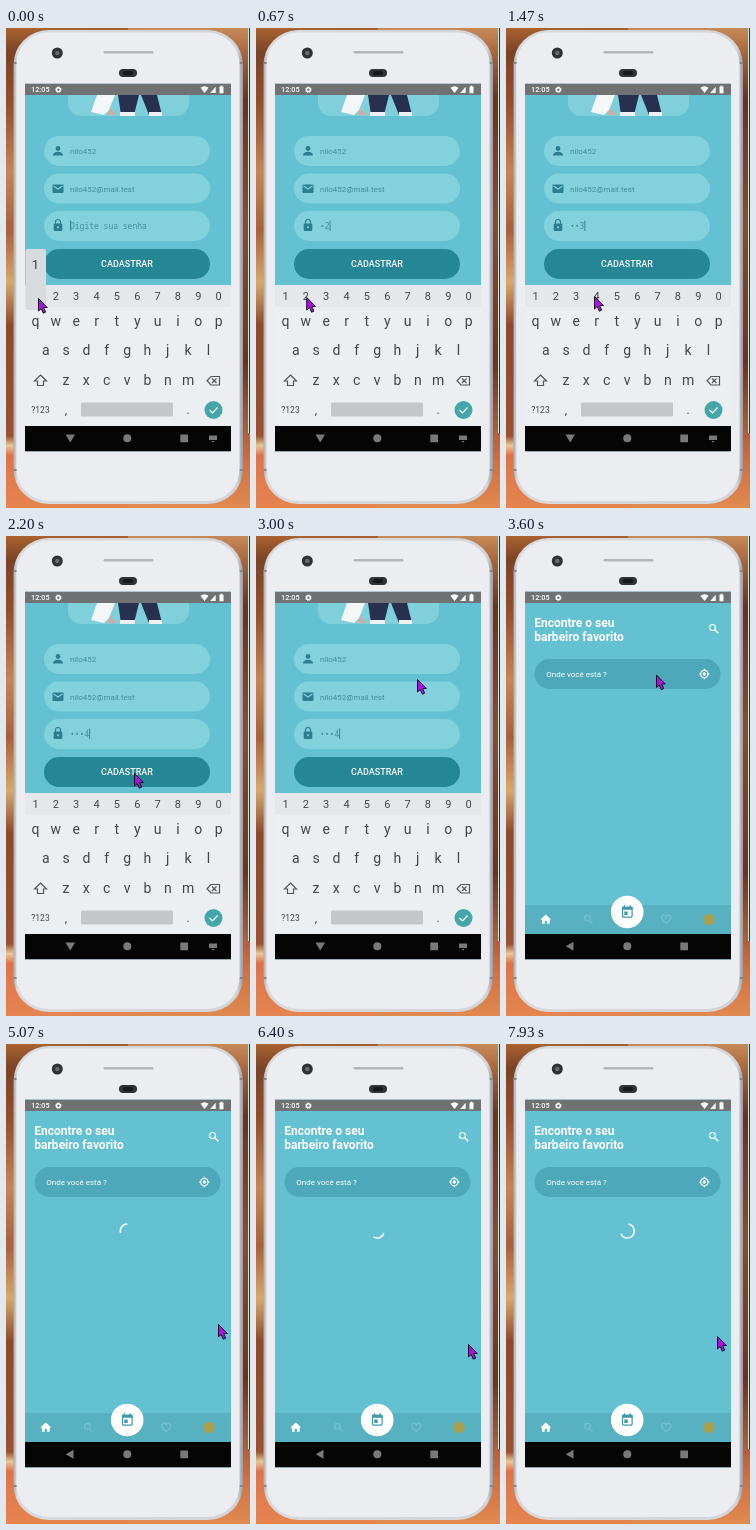
An HTML page that plays this animation: 244 by 480 pixels, repeating every 8000 ms.

```html
<!DOCTYPE html>
<html lang="pt-BR">
<head>
<meta charset="utf-8">
<title>Barbearia</title>
<style>
  html, body { margin: 0; width: 100%; height: 100%; overflow: hidden; background: #a85a33; }
  svg { display: block; width: 100%; height: 100%; font-family: Roboto, sans-serif; }
  .mono { font-family: "Noto Sans Mono", "DejaVu Sans Mono", monospace; }
  .mid { text-anchor: middle; }
  .line { fill: none; stroke-width: 1.2; }
</style>
</head>
<body>
<svg viewBox="0 0 244 480">
  <defs>
    <linearGradient id="wallLeft" x2="0" y2="1">
      <stop offset="0" stop-color="#a9622f"/><stop offset=".05" stop-color="#7b4426"/>
      <stop offset=".16" stop-color="#92502c"/><stop offset=".3" stop-color="#c48656"/>
      <stop offset=".42" stop-color="#a8613a"/><stop offset=".53" stop-color="#d9a86c"/>
      <stop offset=".62" stop-color="#8a4a2c"/><stop offset=".85" stop-color="#9a5232"/>
      <stop offset=".87" stop-color="#ecc79a"/><stop offset=".89" stop-color="#dd7448"/>
      <stop offset="1" stop-color="#e58550"/>
    </linearGradient>
    <linearGradient id="wallRight" x2="0" y2="1">
      <stop offset="0" stop-color="#c68a58"/><stop offset=".06" stop-color="#a4603a"/>
      <stop offset=".15" stop-color="#6d3021"/><stop offset=".4" stop-color="#8a4a32"/>
      <stop offset=".7" stop-color="#74301f"/><stop offset=".9" stop-color="#cf6f42"/>
      <stop offset="1" stop-color="#e08a50"/>
    </linearGradient>
    <linearGradient id="rim">
      <stop offset="0" stop-color="#a9abb0"/><stop offset=".015" stop-color="#d9dade"/>
      <stop offset=".975" stop-color="#d3d4d8"/><stop offset="1" stop-color="#9a9ca2"/>
    </linearGradient>
    <clipPath id="screen"><path d="M19 55.700H225V423.200H19z"/></clipPath>
    <clipPath id="content"><path d="M19 67H225V257H19z"/></clipPath>
  </defs>

  <path fill="url(#wallLeft)" d="M0 0H122V480H0z"/>
  <path fill="url(#wallRight)" d="M122 0H244V480H122z"/>
  <path fill="#c5e9d2" d="M242 0H243V405H242z"/>
  <path fill="#24401f" d="M243 0H244V405H243z"/>

  <rect x="7.500" y="2" width="229.500" height="474" rx="35" fill="url(#rim)"/>
  <path stroke="#85878d" stroke-width="2" d="M7.500 35H11M233.500 35H237M7.500 442H11M233.500 442H237"/>
  <rect x="10.500" y="4.500" width="223" height="468.500" rx="32" fill="#ecedf1"/>
  <circle cx="51.300" cy="25" r="5.500" fill="#303136"/>
  <circle cx="51.300" cy="25" r="2.300" fill="#696b71"/>
  <rect x="97.500" y="23" width="50" height="2.500" rx="1.250" fill="#b4b5ba"/>
  <rect x="113" y="41" width="18" height="8" rx="4" fill="#303238"/>
  <rect x="117" y="43" width="10" height="4" rx="2" fill="#15171b"/>

  <g clip-path="url(#screen)">
    <path fill="#63c1d1" d="M19 55H225V424H19z"/>

    <g id="login">
      <g clip-path="url(#content)">
        <rect x="62" y="40" width="121" height="48" rx="13" fill="#80d0dc"/>
        <path fill="#f5f6f8" d="M91 67H109L103 82 98 87 85 84z"/>
        <path fill="#d9a79b" d="M104 80l6 7h-8z"/>
        <path fill="#27314f" d="M112 67H133L128 87H115z M135 67H151L156 87H143z"/>
        <path fill="#f0f1f4" d="M114 84h15v4h-15z M143 84h13v4h-13z"/>
      </g>
      <g id="fields" fill="#82d2de"></g>
      <g fill="#2c7f8e">
        <circle cx="52" cy="120.500" r="2.400"/><path d="M47 127.500c0-5 10-5 10 0z"/>
        <rect x="46.500" y="156.500" width="11" height="8.500" rx="1"/>
        <path d="M47.500 158l4.500 3 4.500-3" class="line" stroke="#82d2de"/>
        <rect x="47.700" y="195.500" width="8.600" height="7.500" rx="1"/>
        <path d="M49.500 196v-2a2.500 2.500 0 0 1 5 0v2" class="line" stroke="#2c7f8e"/>
        <circle cx="52" cy="199.200" r="1" fill="#82d2de"/>
      </g>
      <g font-size="8" fill="#438f9b">
        <text x="64" y="126">nilo452</text>
        <text x="64" y="163.500">nilo452@mail.test</text>
        <text id="password" class="mono" x="64" y="201"></text>
      </g>
      <rect id="caret" y="192.500" width=".9" height="10.500" fill="#2c7f8e"/>
      <rect x="38" y="221" width="166" height="30" rx="15" fill="#258696"/>
      <text class="mid" x="121" y="239.300" font-size="9" font-weight="500" fill="#fff">CADASTRAR</text>

      <path fill="#eceff2" d="M19 257H225V398H19z"/>
      <path fill="#e4e8eb" d="M19 257H225V279H19z"/>
      <g id="keys" class="mid" fill="#41464a"></g>
      <g class="line" stroke="#50565a">
        <path d="M34.500 347l6 6h-3v4.500h-6V353h-3z"/>
        <path d="M205 348.500h8.500v8.500H205l-4-4.250z M206 350.500l4.500 4.500m0-4.500l-4.500 4.500"/>
      </g>
      <rect x="75" y="374.500" width="92" height="14" rx="1.500" fill="#c3c7ca"/>
      <circle cx="207.500" cy="382" r="9" fill="#45a6aa"/>
      <path d="M203.500 382l3 3 5-5.500" class="line" stroke="#fff"/>
      <g id="popup">
        <rect x="-10" y="221" width="20.500" height="61" rx="2.500" fill="#d7dbde"/>
        <text id="popupLabel" class="mid" y="240.500" font-size="13" fill="#3b4044"></text>
      </g>
    </g>

    <g id="home">
      <path fill="#63c1d1" d="M19 55H225V424H19z"/>
      <g fill="#fff" font-size="12" font-weight="700">
        <text x="28.300" y="90.800">Encontre o seu</text>
        <text x="28.300" y="104.600">barbeiro favorito</text>
      </g>
      <g class="line" stroke="#fff">
        <path d="M208.800 93.800l3.500 3.500" stroke-width="1.500"/><circle cx="206.500" cy="91.500" r="3"/>
      </g>
      <rect x="28.500" y="123" width="186" height="30" rx="15" fill="#4da9b9"/>
      <text x="40.300" y="141" font-size="8" fill="#fff">Onde você está ?</text>
      <g class="line" stroke="#fff">
        <circle cx="198.300" cy="138" r="3.700"/><path d="M198.300 132.800v2m0 6.400v2M193.100 138h2m6.400 0h2"/>
        <circle cx="198.300" cy="138" r="1.700" fill="#fff" stroke="none"/>
      </g>
      <path id="spinner" class="line" stroke="#eefafc" style="stroke-width:1.6"/>
      <path fill="#58b1c1" d="M19 369H225V398H19z"/>
      <path fill="#fff" d="M39.800 378.500l5.400 4.900h-1.500v4.300h-2.800v-3h-2.200v3h-2.800v-4.300h-1.500z"/>
      <g class="line" stroke="#74c1cf">
        <circle cx="81.300" cy="382.200" r="2.800"/><path d="M83.300 384.300l3.300 3.300"/>
        <path d="M160.300 387.600c-7-5.300-4.500-8.800-2.200-8.400 1.400 0 2.200 1.800 2.200 1.800s.8-1.800 2.200-1.800c2.300-.4 4.800 3.100-2.200 8.400z"/>
      </g>
      <circle cx="121.200" cy="376" r="16.300" fill="#fff"/>
      <g fill="#3d98a9">
        <rect x="116.500" y="371.300" width="9.600" height="9.800" rx="1" class="line" stroke="#3d98a9"/>
        <path d="M116 370.700h10.500v3H116z M117.800 369.300h1.300v2h-1.300z M123.500 369.300h1.300v2h-1.300z M118.300 375.500h3.400v3.400h-3.400z"/>
      </g>
      <circle cx="203" cy="383.500" r="5.700" fill="#a8a04f"/>
    </g>

    <path fill="#707173" d="M19 55H225V67H19z"/>
    <g fill="#fff">
      <text x="25" y="64.300" font-size="7.300" font-weight="500">12:05</text>
      <circle cx="52.400" cy="61.700" r="1.900" fill="none" stroke="#fff" stroke-width="1.400"/>
      <circle cx="52.400" cy="61.700" r="2.800" fill="none" stroke="#fff" stroke-width=".8" stroke-dasharray="1.100 1.099"/>
      <path d="M194.500 59.700q4-3 8 0L198.500 65z M209.700 58.700v6.300h-5.500z M213.500 58.700h1v-1h2v1h1v6.500h-4z"/>
    </g>
    <path fill="#050505" d="M19 398H225V424H19z"/>
    <g fill="#77797b">
      <path id="back"/>
      <circle cx="121.300" cy="410.300" r="4"/>
      <path d="M174.300 406.500h7.700v7.700h-7.700z"/>
      <path id="keyboardIcon" d="M203 407.500h8v4.500h-8z M205.500 413h3l-1.500 1.700z"/>
    </g>
  </g>

  <path id="pointer" d="M.5 .5V13L3.200 10.500 5.300 15.200 7.700 14.100 5.600 9.500H9.300z" fill="#ad12e4" stroke="#180c20" stroke-linejoin="round"/>
</svg>

<script>
const LOOP = 8000, HOME_START = 3320, HOME_FADE = 120, SPINNER_START = 3538;
const KEY_STEP = 20.35, FIRST_KEY = 29.5, CHAR_WIDTH = 4.8;
const $ = id => document.getElementById(id);

// Digits 1 to 4: press and release times
const presses = [[0, 110], [520, 640], [1040, 1160], [1600, 1720]];

// Pointer stops: time, x, y
const stops = [
  [0, 32, 270], [120, 32, 270], [460, 50, 269], [650, 50, 269], [980, 70, 268],
  [1170, 70, 268], [1440, 88, 268], [1740, 88, 268], [2150, 128, 237], [2420, 128, 237],
  [2710, 161, 143], [3050, 161, 143], [3450, 150, 138.5], [3830, 150, 138.5],
  [4500, 212, 280], [5300, 212, 280], [6000, 212, 300], [6500, 212, 300],
  [7200, 211, 292], [LOOP, 211, 292]
];

function addRow(labels, x, y, size) {
  [...labels].forEach((label, i) => {
    $('keys').innerHTML += `<text x="${x + i * KEY_STEP}" y="${y}" font-size="${size}">${label}</text>`;
  });
}

for (const y of [108, 145.5, 183])
  $('fields').innerHTML += `<rect x="38" y="${y}" width="166" height="30" rx="15"/>`;

addRow('1234567890', FIRST_KEY, 272, 11);
addRow('qwertyuiop', FIRST_KEY, 298, 14);
addRow('asdfghjkl', 39.7, 327, 14);
addRow('zxcvbnm', 60, 356.5, 14);
addRow(['?123'], 34.5, 385, 8.5);
addRow(',', 60, 385.5, 12);
addRow('.', 182, 385.5, 12);

const clamp = v => Math.min(1, Math.max(0, v));
const smooth = v => v * v * (3 - 2 * v);

// cubic-bezier(.4, 0, .2, 1)
function standardEase(x) {
  let low = 0, high = 1;
  for (let i = 0; i < 20; i++) {
    const u = (low + high) / 2;
    const bx = 1.2 * u * (1 - u) ** 2 + 0.6 * u * u * (1 - u) + u ** 3;
    if (bx < x) low = u; else high = u;
  }
  return smooth(low);
}

function drawPointer(t) {
  const i = stops.findIndex(stop => stop[0] > t);
  const [t0, x0, y0] = stops[i - 1], [t1, x1, y1] = stops[i];
  const k = smooth((t - t0) / (t1 - t0));
  $('pointer').setAttribute('transform', `translate(${x0 + (x1 - x0) * k} ${y0 + (y1 - y0) * k})`);
}

function drawPassword(t) {
  const typed = presses.filter(([, up]) => t >= up).length;
  const lastTyped = typed ? presses[typed - 1][1] : 0;
  $('password').textContent = typed ? '•'.repeat(typed - 1) + typed : 'Digite sua senha';
  $('caret').setAttribute('x', 64 + typed * CHAR_WIDTH);
  $('caret').style.opacity = (t - lastTyped) % 1000 < 500 ? 1 : 0;

  const key = presses.findIndex(([down, up]) => t >= down && t < up);
  $('popup').style.display = key < 0 ? 'none' : '';
  $('popup').setAttribute('transform', `translate(${FIRST_KEY + key * KEY_STEP} 0)`);
  $('popupLabel').textContent = key + 1;
}

// Arc whose head and tail take turns moving while the whole ring rotates
function drawSpinner(t) {
  const elapsed = t - SPINNER_START;
  const visible = elapsed > 90;
  $('spinner').style.display = visible ? '' : 'none';
  if (!visible) return;
  const phase = elapsed % 1333 / 1333;
  const turn = elapsed / 2222 + phase * 0.25 - 0.02;
  const head = phase < 0.5 ? 0.96 * standardEase(phase * 2) : 0.92 + 0.08 * phase;
  const tail = standardEase(clamp(phase * 2 - 1));
  const from = turn + 0.75 * tail, to = turn + 0.75 * head + 0.03;
  const point = a => `${121.3 + 7 * Math.sin(a * 2 * Math.PI)} ${187 - 7 * Math.cos(a * 2 * Math.PI)}`;
  $('spinner').setAttribute('d', `M${point(from)}A7 7 0 ${to - from > 0.5 ? 1 : 0} 1 ${point(to)}`);
}

function draw(now) {
  const t = now % LOOP;
  const atHome = t >= HOME_START;
  $('home').style.opacity = clamp((t - HOME_START) / HOME_FADE);
  $('back').setAttribute('d', atHome ? 'M67.500 405.700v9l-7.700-4.500z' : 'M59.500 406.500h9.500l-4.750 8z');
  $('keyboardIcon').style.display = atHome ? 'none' : '';
  drawPassword(t);
  drawSpinner(t);
  drawPointer(t);
}

const start = performance.now();
function tick() {
  draw(performance.now() - start);
  requestAnimationFrame(tick);
}
tick();
</script>
</body>
</html>
```
